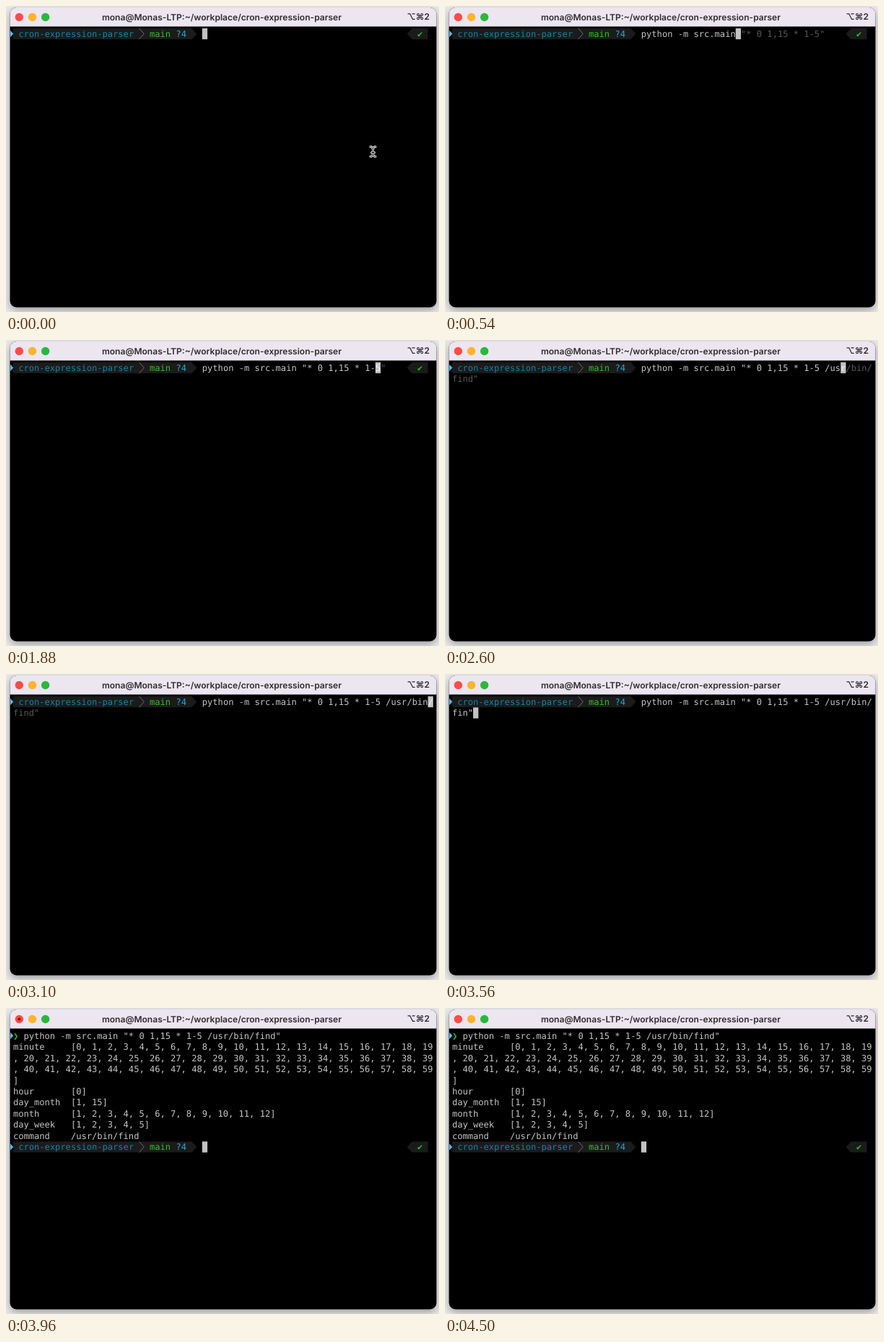
These frames come from a looping animation (600 by 425 pixels, 6.54 s). An HTML page:

```html
<!DOCTYPE html>
<html lang="en">
<head>
<meta charset="utf-8">
<title>Terminal</title>
<style>
  html, body { margin: 0; width: 100%; height: 100%; overflow: hidden; background: #eaeaea; }
  svg { display: block; width: 100vw; height: 100vh; }
  text { white-space: pre; text-rendering: geometricPrecision; }
  #screen text { font: 12.084px "DejaVu Sans Mono", monospace; }
  #screen .bold { font-weight: bold; }
  .bar { font: 600 12.05px Inter, "DejaVu Sans", sans-serif; fill: #2f2c31; }
  .frame { filter: drop-shadow(0 4px 6px rgba(0, 0, 0, .33)); }
</style>
</head>
<body>
<svg viewBox="0 0 600 425" xml:space="preserve">
  <defs>
    <path id="beam" d="M505 195.5h1.2l2.3 2.3 2.3-2.3h1.2M508.5 198v9M505 209h1.2l2.3-2.3 2.3 2.3h1.2M506.5 203.5h4"/>
  </defs>
  <rect class="frame" x="5.5" y="2" width="591" height="416.5" rx="9"/>
  <path d="M5.5 28.5V11a9 9 0 0 1 9-9h573a9 9 0 0 1 9 9v17.5z" fill="#ebe6ef"/>
  <circle cx="18.3" cy="15.5" r="5.7" fill="#fc4b48"/>
  <circle cx="36.5" cy="15.5" r="5.7" fill="#fdb32c"/>
  <circle cx="54.6" cy="15.5" r="5.7" fill="#29b93a"/>
  <circle id="busy" cx="18.3" cy="15.5" r="2" fill="#7c0a08"/>
  <text class="bar" x="465" y="19.5" text-anchor="end">mona@Monas-LTP:~/workplace/cron-expression-parser</text>
  <text class="bar" x="587" y="19" text-anchor="end">⌥⌘2</text>
  <g id="screen"></g>
  <g id="pointer" fill="none" stroke-linecap="round">
    <use href="#beam" stroke="#eee" stroke-width="3"/>
    <use href="#beam" stroke="#111"/>
  </g>
</svg>
<script>
const LOOP = 6540, COLS = 80, CW = 7.275, RH = 15.44, LEFT = 9.9, TOP = 31;
const START = 36;                       // column where input begins
const STATUS = 75;                      // column of the right-hand status
const ENTER = 3820, OUTPUT = 3900, IDLE = 4400;
const FG = '#c4c4c4', DIM = '#585858', GREEN = '#32bd27';

const SHORT = 'python -m src.main "* 0 1,15 * 1-5"';
const FULL = 'python -m src.main "* 0 1,15 * 1-5 /usr/bin/find"';

// [start, ms per key, keys]; \b deletes one character
const BURSTS = [
  [60, 28, 'python -m src.main'],
  [620, 0, ' '],
  [780, 76, '"* 0 1,15'],
  [1520, 90, ' * 1-'],
  [1980, 0, '5'],
  [2180, 140, ' /us'],
  [2680, 120, 'r/'],
  [2860, 88, 'bin/fin"'],
  [3580, 80, '\bd"'],
];
const KEYS = BURSTS.flatMap(([at, gap, keys]) => [...keys].map((key, i) => [at + i * gap, key]));

const list = (from, to) =>
  '[' + Array.from({ length: to - from + 1 }, (_, i) => from + i).join(', ') + ']';
const RESULT = [
  ['minute', list(0, 59)],
  ['hour', '[0]'],
  ['day_month', '[1, 15]'],
  ['month', list(1, 12)],
  ['day_week', list(1, 5)],
  ['command', '/usr/bin/find'],
].map(([name, value]) => name.padEnd(11) + value);

const $ = id => document.getElementById(id);
const X = col => LEFT + col * CW;
const Y = row => TOP + row * RH;
const wrap = s => s.match(new RegExp(`.{1,${COLS}}`, 'g')) || [];

const put = (col, row, s, fill, style = '') =>
  `<text class="${style}" x="${X(col)}" y="${Y(row) + 11.8}" fill="${fill}" xml:space="preserve">${s}</text>`;

// Text flowing from a cell index, wrapped at the right edge
function flow(index, s, fill) {
  let out = '';
  while (s) {
    const col = index % COLS, part = s.slice(0, COLS - col);
    out += put(col, Math.floor(index / COLS), part, fill);
    s = s.slice(part.length);
    index += part.length;
  }
  return out;
}

function cursor(index, glyph = '') {
  const col = index % COLS, row = Math.floor(index / COLS);
  return `<rect x="${X(col)}" y="${Y(row)}" width="${CW}" height="15.2" fill="#c2c2c2"/>` +
    (glyph.trim() ? put(col, row, glyph, '#f4f4f4') : '');
}

const marker = row =>
  `<path d="M6 ${Y(row) + 3}l4.3 4.6-4.3 4.6z" fill="#55b7f2"/>`;

// Filled segment between two columns, with its pointed end at tip
function segment(row, flat, shoulder, tip) {
  const y = Y(row), end = y + 15.2;
  return `<path d="M${X(flat)} ${y}H${X(shoulder)}L${X(tip)} ${y + 7.6} ${X(shoulder)} ${end}H${X(flat)}z" fill="#1b1b1b"/>`;
}

const status = row => segment(row, 79, 76, STATUS) + put(77, row, '✔', GREEN);

function prompt(row) {
  const y = Y(row);
  return segment(row, 0, 34, 35) + marker(row) +
    `<path d="M${X(24)} ${y}L${X(25) - .5} ${y + 7.6} ${X(24)} ${y + 15.2}" fill="none" stroke="#777" stroke-width=".9"/>` +
    put(1, row, 'cron-expression-parser', '#0d84a8') +
    put(26, row, 'main', GREEN) +
    put(31, row, '?4', '#27a5d8');
}

function typedAt(t) {
  let s = '';
  for (const [at, key] of KEYS) {
    if (at > t) break;
    s = key === '\b' ? s.slice(0, -1) : s + key;
  }
  return s;
}

function editing(t) {
  const typed = typedAt(t), at = START + typed.length;
  const match = typed && [SHORT, FULL].find(s => s.startsWith(typed)) || '';
  const ghost = match.slice(typed.length);
  const roomy = at + ghost.length < STATUS;
  return prompt(0) + (roomy ? status(0) : '') +
    flow(START, typed, FG) + flow(at + 1, ghost.slice(1), DIM) + cursor(at, ghost[0]);
}

function finished(t) {
  const out = marker(0) + put(0, 0, '❯', GREEN, 'bold') + put(2, 0, FULL, FG);
  if (t < OUTPUT) return out + cursor(COLS);
  const lines = RESULT.flatMap(wrap), last = lines.length + 1;
  return out + lines.map((line, i) => put(0, i + 1, line, FG)).join('') +
    prompt(last) + status(last) + cursor(last * COLS + START);
}

let shown = '';
function render(t) {
  const html = t < ENTER ? editing(t) : finished(t);
  if (html !== shown) $('screen').innerHTML = shown = html;
  $('busy').style.display = t >= ENTER && t < IDLE ? '' : 'none';
  $('pointer').style.display = t < 60 ? '' : 'none';
}

const begin = performance.now();
function tick() {
  render((performance.now() - begin) % LOOP);
  requestAnimationFrame(tick);
}
tick();
</script>
</body>
</html>
```
